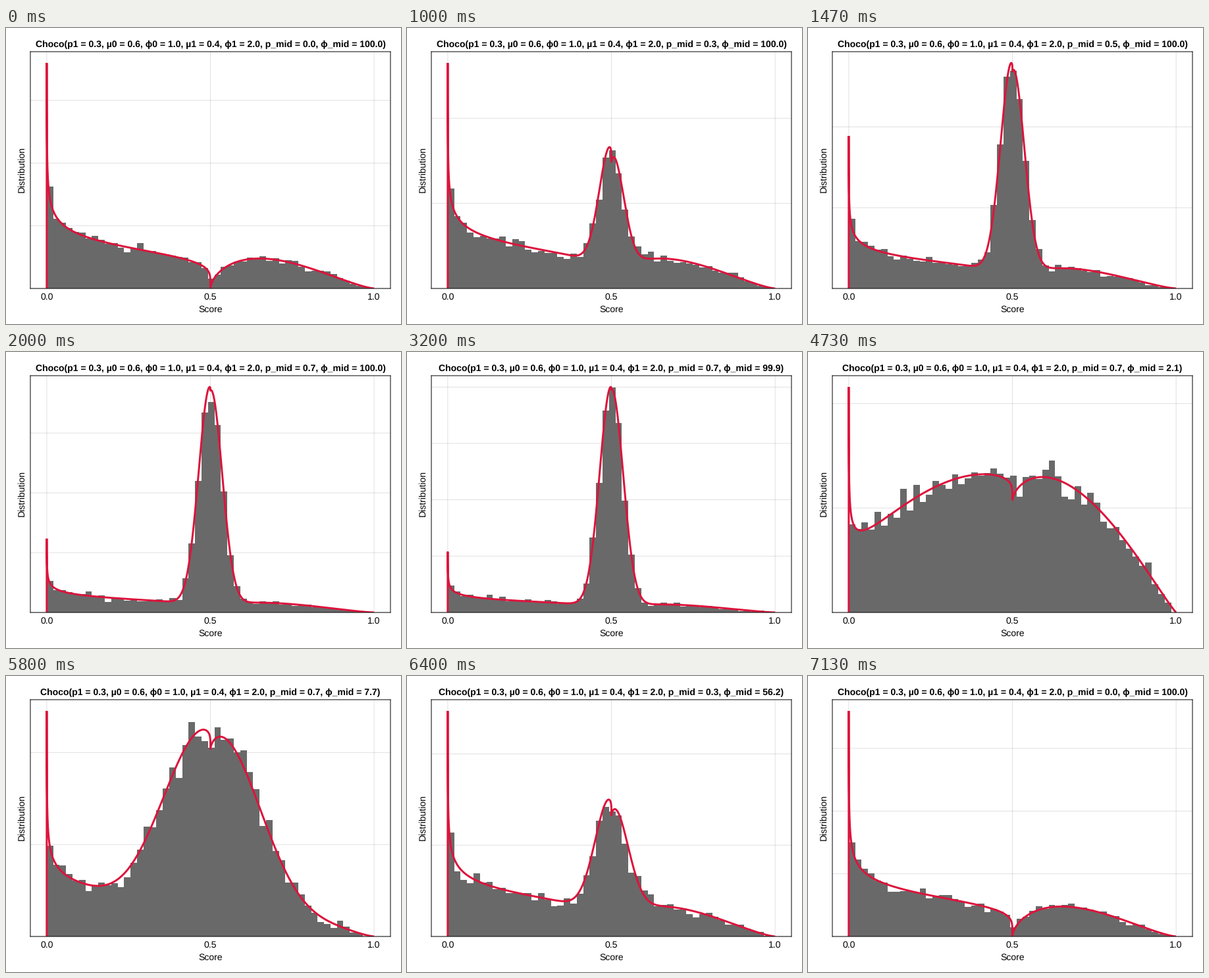
These frames come from a looping animation (600x450 px, 7990 ms). A matplotlib script:

```python
import math

import matplotlib.pyplot as plt
import numpy as np
from matplotlib.animation import FuncAnimation

W, H, DPI = 600, 450, 100
PX = 72 / DPI
FRAMES, LOOP_MS = 120, 7990
LAST = FRAMES - 1
BINS, SAMPLES, MAX_SCORE = 50, 8000, 0.985
FONT = ["Liberation Sans", "DejaVu Sans"]

P1, MU0, PHI0, MU1, PHI1 = 0.3, 0.6, 1.0, 0.4, 2.0
P_MID, PHI_NARROW, PHI_FLAT = 0.7, 100.0, 2.0
# Parts of the loop in which the parameters move: rise, flatten, return
RISE, FLATTEN, RETURN = PHASES = (0, 0.3), (0.4, 0.6), (0.7, 0.9)

plt.rcParams["text.hinting"] = "none"


def beta_pdf(y, mu, phi):
    """Beta density by mean and precision; flat at mu = 0.5, phi = 1."""
    a, b = 2 * phi * mu, 2 * phi * (1 - mu)
    log_norm = math.lgamma(a + b) - math.lgamma(a) - math.lgamma(b)
    out = np.zeros_like(y)
    ok = (y > 1e-9) & (y < 1 - 1e-9)
    out[ok] = np.exp(log_norm + (a - 1) * np.log(y[ok])
                     + (b - 1) * np.log(1 - y[ok]))
    return out


x = np.linspace(0, 1, 10001)
SIDES = 2 * ((1 - P1) * beta_pdf(1 - 2 * x, MU0, PHI0)
             + P1 * beta_pdf(2 * x - 1, MU1, PHI1))


def density(p_mid, phi_mid):
    return (1 - p_mid) * SIDES + p_mid * beta_pdf(x, 0.5, phi_mid)


def moving_step(i):
    """Step on show: after a phase ends, its last step stays."""
    start, end = max(p for p in PHASES if i / LAST >= p[0])
    return min(i, int(end * LAST))


def ease(i, phase, first, final):
    u = np.clip((i / LAST - phase[0]) / (phase[1] - phase[0]), 0, 1)
    return first + (final - first) * (1 - math.cos(math.pi * u)) / 2


def params(i):
    if i / LAST < RETURN[0]:
        return (ease(i, RISE, 0, P_MID),
                ease(i, FLATTEN, PHI_NARROW, PHI_FLAT))
    return ease(i, RETURN, P_MID, 0), ease(i, RETURN, PHI_FLAT, PHI_NARROW)


def histogram(curve, seed):
    """Seeded sample counts per bin, scaled to a density."""
    edges = np.linspace(0, MAX_SCORE, BINS + 1)
    cdf = np.append(0, np.cumsum((curve[1:] + curve[:-1]) / 2)) * x[1]
    mass = np.diff(np.interp(edges, x, cdf))
    counts = np.random.default_rng(seed).poisson(SAMPLES * mass)
    heights = counts / (SAMPLES * edges[1])
    return np.minimum(heights, curve.max()), edges


def label(px, py, text, size=14, **kw):
    return fig.text(px / W, 1 - py / H, text, fontsize=size * PX, family=FONT,
                    color="black", ha="center", va="baseline", **kw)


fig = plt.figure(figsize=(W / DPI, H / DPI), dpi=DPI, facecolor="white")
LEFT, RIGHT, TOP, BOTTOM = 37, 584, 36, 396
ax = fig.add_axes([LEFT / W, 1 - BOTTOM / H, (RIGHT - LEFT) / W, (BOTTOM - TOP) / H])
ax.set_xlim(-0.05, 1.05)
ax.set_xticks([0, 0.5, 1])
ax.tick_params(length=0, labelbottom=False, labelleft=False)
ax.set_axisbelow(True)
ax.grid(color="black", alpha=0.12, linewidth=PX, snap=False)
for spine in ax.spines.values():
    spine.set(linewidth=PX, snap=False)

bars = ax.stairs(np.zeros(BINS), np.linspace(0, 1, BINS + 1), fill=True,
                 color="dimgray", linewidth=0, zorder=1.5)
line, = ax.plot(x, SIDES, color="crimson", linewidth=3 * PX, zorder=2,
                solid_joinstyle="bevel", solid_capstyle="butt")

title = label(310.5, 29, "", 14.04, weight="bold")
for value in (0.0, 0.5, 1.0):
    label(62 + 497 * value, 412.5, f"{value:.1f}")
label(310.5, 431.5, "Score")
label(28, 215, "Distribution", rotation=90, rotation_mode="anchor")


def update(frame):
    i = moving_step(frame)
    p_mid, phi_mid = params(i)
    curve = density(p_mid, phi_mid)
    line.set_ydata(curve)
    bars.set_data(*histogram(curve, seed=100 + i))

    top = 1.05 * curve.max()
    ax.set_ylim(0, top)
    ax.set_yticks(np.arange(0, top, 2 if top > 5 else 1))
    title.set_text(
        f"Choco(p1 = {P1}, µ0 = {MU0}, ϕ0 = {PHI0}, µ1 = {MU1}, ϕ1 = {PHI1}, "
        f"p_mid = {p_mid:.1f}, ϕ_mid = {phi_mid:.1f})")
    return line, bars, title


anim = FuncAnimation(fig, update, frames=FRAMES, interval=LOOP_MS / FRAMES,
                     repeat=True, repeat_delay=0, blit=False)
plt.show()
```
